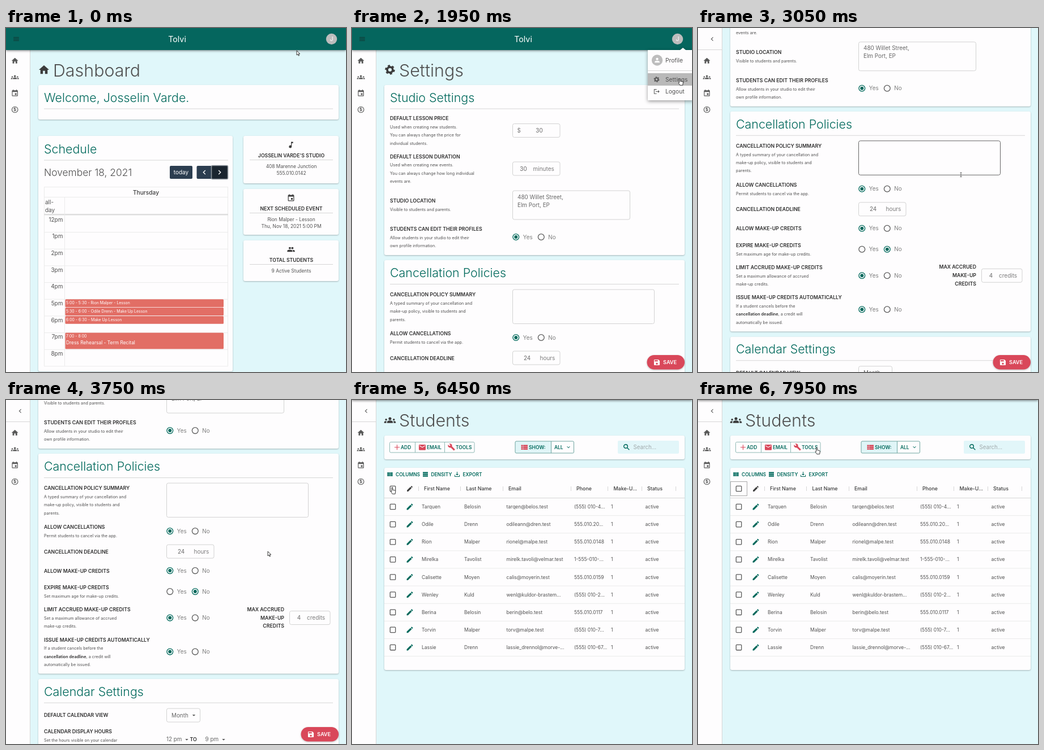
Animation, 600 px wide and 609 px high, one loop 8000 ms. Source, as an HTML page:

```html
<!DOCTYPE html>
<html lang="en">
<head>
<meta charset="utf-8">
<title>Studio manager tour</title>
<style>
  html, body { margin: 0; width: 100%; height: 100%; overflow: hidden; background: #e0f7fa; }
  svg { display: block; width: 600px; height: 609px; font-family: Inter, "Open Sans", sans-serif; }
  text { fill: #505050; white-space: pre; }
  .bold { font-weight: 600; fill: #2e2e2e; }
  .medium { font-weight: 500; fill: #3a3a3a; }
  .large { font-weight: 350; }
  .teal { fill: #00695c; }
  .white { fill: #fff; }
  .grey { fill: #7c7c7c; }
  .value { fill: #666; }
  .pale { fill: #a0a8aa; }
  .mid { text-anchor: middle; }
  .end { text-anchor: end; }
  .card { fill: #fefdfe; filter: drop-shadow(0 1px 1px #0004); }
  .field { fill: none; stroke: #d2d2d2; }
  .field.hover { stroke: #666; }
  .line { stroke: #d6d6d6; }
  .faint { stroke: #ebebeb; }
</style>
</head>
<body>
<svg id="stage" viewBox="0 0 600 609"></svg>
<script>
const TEAL = '#00695c', RED = '#d9485a', DARK = '#3c3c3c', GREY = '#5a5a5a', NAVY = '#2c3e50';

const ICONS = {
  home: '<path d="M10 20v-6h4v6h5v-8h3L12 3 2 12h3v8z"/>',
  menu: '<path d="M3 18h18v-2H3zM3 13h18v-2H3zM3 6v2h18V6z"/>',
  groups: `<circle cx="12" cy="9" r="3"/><circle cx="4" cy="11" r="2"/><circle cx="20" cy="11" r="2"/>
    <path d="M6 18v-1.6q0-3.6 6-3.6t6 3.6V18zM0 18v-1.6Q0 14 4 14l1.1.1q-.6 1-.6 2.3V18zM24 18v-1.6Q24 14 20 14l-1.1.1q.6 1 .6 2.3V18z"/>`,
  people: `<circle cx="8.5" cy="8" r="3.2"/><circle cx="16" cy="8" r="3.2"/>
    <path d="M1 19v-2.3Q1 13 8.5 13t7.5 3.7V19zM17.5 19v-2.5q0-2-1.6-3.4 7.1.2 7.1 3.6V19z"/>`,
  event: '<path d="M17 12h-5v5h5zM16 1v2H8V1H6v2H5q-2 0-2 2v14q0 2 2 2h14q2 0 2-2V5q0-2-2-2h-1V1zM19 19H5V8h14z"/>',
  dollar: `<circle cx="12" cy="12" r="9" fill="none" stroke="currentColor" stroke-width="2"/>
    <text x="12" y="17" font-size="14" class="mid medium">$</text>`,
  gear: `<g fill="none" stroke="currentColor"><circle cx="12" cy="12" r="5.6" stroke-width="4.2"/>
    <circle cx="12" cy="12" r="8.4" stroke-width="3.2" pathLength="12" stroke-dasharray="1 1"/></g>`,
  edit: '<path d="M3 17.25V21h3.75L17.8 9.94l-3.75-3.75zM20.7 7q.6-.7 0-1.4l-2.3-2.3q-.7-.6-1.4 0l-1.9 1.8 3.75 3.75z"/>',
  note: '<path d="M12 3v10.55A4 4 0 1 0 14 17V7h4V3z"/>',
  save: '<path d="M17 3H5q-2 0-2 2v14q0 2 2 2h14q2 0 2-2V7zM12 19a3 3 0 1 1 0-6 3 3 0 0 1 0 6zM15 9H5V5h10z"/>',
  email: '<path d="M20 4H4q-2 0-2 2v12q0 2 2 2h16q2 0 2-2V6q0-2-2-2zM20 8l-8 5-8-5V6l8 5 8-5z"/>',
  wrench: '<path d="M22.7 19l-9.1-9.1c.9-2.3.4-5-1.5-6.9-2-2-5-2.4-7.4-1.3L9 6 6 9 1.6 4.7C.4 7.1.9 10.1 2.9 12.1c1.9 1.9 4.6 2.4 6.9 1.5l9.1 9.1q.7.6 1.4 0l2.3-2.3q.7-.8.1-1.4z"/>',
  search: '<g fill="none" stroke="currentColor" stroke-width="2.4"><circle cx="9.5" cy="9.5" r="5.5"/><path d="M14 14l6 6"/></g>',
  list: '<path d="M3 5h5v4H3zM3 10h5v4H3zM3 15h5v4H3zM9 5h13v4H9zM9 10h13v4H9zM9 15h13v4H9z"/>',
  plus: '<path d="M11 4h2v7h7v2h-7v7h-2v-7H4v-2h7z"/>',
  columns: '<path d="M3 5h5v14H3zM9.5 5h5v14h-5zM16 5h5v14h-5z"/>',
  density: '<path d="M3 4h18v4.5H3zM3 10h18v4.5H3zM3 16h18v4.5H3z"/>',
  download: '<path d="M11 3h2v8h4l-5 5-5-5h4zM3 14h2v5h14v-5h2v7H3z"/>',
  logout: '<path d="M3 4h9v2H5v12h7v2H3zM9 11h8V7l5 5-5 5v-4H9z"/>',
  left: '<path d="M15.4 7.4L14 6l-6 6 6 6 1.4-1.4-4.6-4.6z"/>',
  right: '<path d="M8.6 7.4L10 6l6 6-6 6-1.4-1.4 4.6-4.6z"/>',
  down: '<path d="M7.4 8.6L6 10l6 6 6-6-1.4-1.4-4.6 4.6z"/>',
  caret: '<path d="M7 10l5 5 5-5z"/>',
  person: '<circle cx="12" cy="8" r="4"/><path d="M4 20v-2q0-4 8-4t8 4v2z"/>',
};

// y is the vertical middle of the capitals
const text = (x, y, size, str, cls = '') =>
  `<text x="${x}" y="${y + size * .36}" font-size="${size}" class="${cls}">${str}</text>`;
const icon = (name, x, y, size, color = GREY) =>
  `<g transform="translate(${x - size / 2} ${y - size / 2}) scale(${size / 24})" style="color:${color}" fill="currentColor" fill-rule="evenodd">${ICONS[name]}</g>`;
const rect = (x, y, w, h, attrs = '') => `<rect x="${x}" y="${y}" width="${w}" height="${h}" ${attrs}/>`;
const line = (x1, y1, x2, y2, cls = 'line') => `<path class="${cls}" d="M${x1} ${y1}L${x2} ${y2}"/>`;
const card = (x, y, right, bottom) => rect(x, y, right - x, bottom - y, 'rx="3" class="card"');
const field = (x, y, right, bottom) => rect(x, y, right - x, bottom - y, 'rx="3" class="field"');
const range = (n, fn) => Array.from({ length: n }, (_, i) => fn(i)).join('');
const title = (name, size, y, str) => icon(name, 67, y - 1, size, DARK) + text(83, y, 30.4, str, 'large');
const section = (y, str, right = 577) => text(67, y, 21.4, str, 'teal large') + line(67, y + 20, right, y + 20);

function infoCard(top, bottom, name, label, ...lines) {
  return card(419, top, 587, bottom) + icon(name, 503, top + 16, 14.5, DARK) +
    text(503.5, top + 35, 8.7, label, 'bold mid') + line(430, top + 42.5, 577, top + 42.5) +
    lines.map((s, i) => text(503.5, top + 54 + 12 * i, 8.4, s, 'mid')).join('');
}

function dashboard() {
  const hour = 29.65, grid = 332;
  const event = (start, length, ...lines) => {
    const y = grid + start * hour;
    return rect(104.5, y, 279.5, length * hour - .9, 'rx="1.5" fill="#e26e65"') +
      lines.map((s, i) => text(106, y + 6.3 + i * 11.5, i ? 8.4 : 6.9, s, 'white')).join('');
  };
  return title('home', 21.6, 75, 'Dashboard') +
    card(57, 101, 587, 162) + section(123, 'Welcome, Josselin Varde.') +
    card(57, 191, 400, 608) + section(214, 'Schedule', 392) +
    text(67, 255.5, 17.4, 'November 18, 2021', 'large') +
    rect(289, 244, 40, 23, `rx="2" fill="${NAVY}"`) + text(309, 255, 10, 'today', 'white mid') +
    rect(336.5, 244, 55, 23, `rx="2" fill="${NAVY}"`) +
    rect(362.5, 243.5, 29, 24, 'rx="2" fill="#1a252f" stroke="#8d959c" stroke-width="1.6"') +
    icon('left', 350, 255.5, 16, '#fff') + icon('right', 377, 255.5, 16, '#fff') +
    line(67, 281.5, 392, 281.5, 'faint') + line(67, 299.5, 392, 299.5, 'faint') +
    line(67.5, 281, 67.5, 598, 'faint') + line(391.5, 281, 391.5, 598, 'faint') +
    text(247, 291, 10.2, 'Thursday', 'medium mid') +
    text(69, 308, 10, 'all-') + text(69, 322, 10, 'day') +
    rect(67, 329, 325, 2.5, 'fill="#dedede"') + line(103.5, 300, 103.5, 598, 'faint') +
    range(9, i => text(100.5, grid + 7 + i * hour, 10, (i || 12) + 'pm', 'end') +
      line(67, grid + (i + 1) * hour, 392, grid + (i + 1) * hour, 'faint')) +
    event(5, .5, '5:00 - 5:30 - Rion Malper - Lesson') +
    event(5.5, .5, '5:30 - 6:00 - Odile Drenn - Make Up Lesson') +
    event(6, .5, '6:00 - 6:30 - Make Up Lesson') +
    event(7, 1, '7:00 - 8:00', 'Dress Rehearsal - Term Recital') +
    infoCard(191, 275, 'note', "JOSSELIN VARDE'S STUDIO", '408 Marenne Junction', '555.010.0142') +
    infoCard(285, 366, 'event', 'NEXT SCHEDULED EVENT', 'Rion Malper - Lesson', 'Thu, Nov 18, 2021 5:00 PM') +
    infoCard(376, 448, 'people', 'TOTAL STUDENTS', '9 Active Students');
}

function settings() {
  const option = (y, label, ...notes) => text(67, y, 8.75, label, 'bold') +
    notes.map((s, i) => text(67, y + 15.2 + 14.4 * i, 7.25, s)).join('');
  const radio = (x, y, label, on) =>
    `<circle cx="${x}" cy="${y}" r="5.4" fill="none" stroke="${on ? TEAL : GREY}" stroke-width="1.3"/>` +
    (on ? `<circle cx="${x}" cy="${y}" r="3" fill="${TEAL}"/>` : '') + text(x + 12.5, y, 9.8, label, 'grey');
  const yesNo = (y, yes = true) => radio(289.3, y, 'Yes', yes) + radio(333.8, y, 'No', !yes);
  const amount = (y, x, value, unit, unitX) => field(283.5, y - 12, 367, y + 12) +
    text(x, y, 9.9, value, 'value mid') + text(unitX, y, 10, unit, 'grey');
  return title('gear', 21, 75, 'Settings') +
    card(57, 101, 587, 402) + section(123, 'Studio Settings') +
    option(160, 'DEFAULT LESSON PRICE', 'Used when creating new students.', 'You can always change the price for', 'individual students.') +
    amount(181.5, 330.5, '30', '$', 291.5) +
    option(227.5, 'DEFAULT LESSON DURATION', 'Used when creating new events.', 'You can always change how long individual', 'events are.') +
    amount(249, 302.5, '30', 'minutes', 319.5) +
    option(306, 'STUDIO LOCATION', 'Visible to students and parents.') +
    field(283.5, 288, 490.5, 339) +
    text(292, 299, 9.9, '480 Willet Street,', 'value') + text(292, 313, 9.9, 'Elm Port, EP', 'value') +
    option(356, 'STUDENTS CAN EDIT THEIR PROFILES', 'Allow students in your studio to edit their', 'own profile information.') +
    yesNo(370) +
    card(57, 411, 587, 800.5) + section(433.5, 'Cancellation Policies') +
    option(472, 'CANCELLATION POLICY SUMMARY', 'A typed summary of your cancellation and', 'make-up policy, visible to students and', 'parents.') +
    field(283.5, 463, 533.5, 523.5) +
    option(541, 'ALLOW CANCELLATIONS', 'Permit students to cancel via the app.') + yesNo(548) +
    option(584.5, 'CANCELLATION DEADLINE') + amount(584, 309, '24', 'hours', 331.5) +
    option(618.5, 'ALLOW MAKE-UP CREDITS') + yesNo(618) +
    option(648, 'EXPIRE MAKE-UP CREDITS', 'Set maximum age for make-up credits.') + yesNo(655, false) +
    option(687, 'LIMIT ACCRUED MAKE-UP CREDITS', 'Set a maximum allowance of accrued', 'make-up credits.') + yesNo(701.5) +
    ['MAX ACCRUED', 'MAKE-UP', 'CREDITS'].map((s, i) => text(491, 686.5 + 14.8 * i, 8.75, s, 'bold end')).join('') +
    field(500.5, 689.5, 572, 713.5) + text(517, 701.5, 9.9, '4', 'value mid') + text(531, 701.5, 10, 'credits', 'grey') +
    option(740.5, 'ISSUE MAKE-UP CREDITS AUTOMATICALLY', 'If a student cancels before the',
      '<tspan class="bold">cancellation deadline</tspan>, a credit will', 'automatically be issued.') + yesNo(761.5) +
    card(57, 810, 587, 1100) + section(832, 'Calendar Settings') +
    option(874, 'DEFAULT CALENDAR VIEW') + field(283.5, 862, 342.5, 886) +
    text(292, 874, 9.9, 'Month', 'value') + icon('caret', 331.5, 874, 13) +
    option(903, 'CALENDAR DISPLAY HOURS', 'Set the hours visible on your calendar') +
    text(283, 916, 9.9, '12 pm', 'value') + icon('caret', 319, 917, 13) + text(324.5, 917, 8.75, 'TO', 'bold') +
    text(351.5, 916, 9.9, '9 pm', 'value') + icon('caret', 384, 917, 13);
}

const STUDENTS = [
  ['Tarquen', 'Belosin', 'tarqen@belos.test', '(555) 010-4...'],
  ['Odile', 'Drenn', 'odileann@dren.test', '555.010.20...'],
  ['Rion', 'Malper', 'rionel@malpe.test', '555.010.0148'],
  ['Mirelka', 'Tavolist', 'mirelk.tavoli@velmar.test', '1-555-010-...'],
  ['Calisette', 'Moyen', 'calis@moyerin.test', '555.010.0159'],
  ['Wenley', 'Kuld', 'wenl@kuldor-brastem...', '(555) 010-2...'],
  ['Berina', 'Belosin', 'berin@belo.test', '555.010.0117'],
  ['Torvin', 'Malper', 'torv@malpe.test', '(555) 010-7...'],
  ['Lassie', 'Drenn', 'lassie_drennol@morve-...', '(555) 010-67...'],
];

function students() {
  const box = y => rect(67.3, y - 4.7, 9.4, 9.4, `rx="1" class="off" fill="none" stroke="${GREY}" stroke-width="1.3"`) +
    `<g class="on">${rect(66.7, y - 5.3, 10.6, 10.6, `rx="1.4" fill="${TEAL}"`)}
     <path d="M69 ${y}l2.2 2.3 4-4.4" fill="none" stroke="#fff" stroke-width="1.3"/></g>`;
  const row = (cells, i) => {
    const y = 189 + 31.13 * i;
    return rect(57, y - 15.5, 530, 31.13, 'class="on" fill="#ebf0f0"') + box(y) + icon('edit', 102, y, 14.5, TEAL) +
      [...cells, '1', 'active'].map((s, c) => text([123, 198, 272.5, 392, 457, 517.5][c], y, 8.5, s)).join('') +
      line(57, y + 15.6, 587, y + 15.6, 'faint');
  };
  const heads = ['First Name', 'Last Name', 'Email', 'Phone', 'Make-U...', 'Status'];
  const tool = (x, name, label) => icon(name, x, 131.5, 12, TEAL) + text(x + 10, 131.5, 8.4, label, 'bold teal');
  const outline = 'fill="none" stroke="#8fb9b5"';
  return `<g transform="translate(0 39)">` + title('groups', 20.5, 36.5, 'Students') +
    card(57, 63, 587, 105) + rect(66.5, 74.5, 149.5, 18.5, 'rx="2" ' + outline) +
    `<path d="M111.5 75v18M163.5 75v18" ${outline}/>` +
    icon('plus', 79.5, 83.8, 13.5, RED) + text(86, 83.8, 8.4, 'ADD', 'bold teal') +
    icon('email', 124, 83.8, 14.5, RED) + text(132, 83.8, 8.4, 'EMAIL', 'bold teal') +
    icon('wrench', 175.5, 83.3, 13.5, RED) + text(183, 83.8, 8.4, 'TOOLS', 'bold teal') +
    rect(288, 73, 63.5, 21, 'rx="2" fill="#e0f5f7"') + rect(288, 73, 103.5, 21, 'rx="2" fill="none" stroke="#6fa5a0"') +
    `<path d="M351.5 73v21" stroke="#6fa5a0"/>` +
    icon('list', 304, 83.8, 14.5, RED) + text(312, 83.8, 8.6, 'SHOW:', 'bold teal') +
    text(357, 83.8, 8.4, 'ALL', 'bold teal') + icon('down', 382, 83.5, 11, TEAL) +
    rect(469, 72, 108, 23, 'rx="2" fill="#e2f6f9"') + icon('search', 484.5, 83.5, 14.5, TEAL) +
    text(496.5, 83.5, 9.7, 'Search...', 'pale') +
    card(57, 120, 587, 478) +
    tool(67, 'columns', 'COLUMNS') + tool(129.5, 'density', 'DENSITY') + tool(185.5, 'download', 'EXPORT') +
    `<g id="focus">${rect(57.5, 144.5, 29, 25, 'fill="none" stroke="#a9a9a9"')}</g>` +
    `<circle class="on" cx="72" cy="157" r="8.5" fill="${TEAL}" opacity=".22"/>` +
    box(157) + icon('edit', 102, 157, 13, DARK) +
    heads.map((s, i) => text([127, 201.5, 276, 396, 461.5, 521][i], 157, 8.9, s, 'medium')).join('') +
    [117.5, 191.5, 266.5, 386.5, 451.5, 511.5, 571.5].map(x => line(x, 153, x, 161)).join('') +
    line(57, 173.5, 587, 173.5) + STUDENTS.map(row).join('') + '</g>';
}

const SIDE_ITEMS = [['home', 58], ['groups', 87], ['event', 115.5], ['dollar', 144.5]];
const sidebar = rect(0, 0, 42, 609, 'fill="#fefdfe"') +
  rect(0, 0, 42, 28.5, 'id="sideHover" fill="#eee"') + line(42.5, 0, 42.5, 609) + line(0, 38.5, 42, 38.5) +
  icon('left', 25, 19.5, 14) + SIDE_ITEMS.map(([name, y]) => icon(name, 15.7, y, 14)).join('');
const appBar = rect(0, 0, 600, 39, 'fill="#05665e" style="filter:drop-shadow(0 1px 2px #0008)"') +
  icon('menu', 18, 19.5, 13, '#16302d') + text(302, 19.5, 14.3, 'Tolvi', 'white mid') +
  '<circle cx="574.5" cy="19.5" r="9.7" fill="#bdbdbd"/>' + text(574.5, 19.5, 10.5, 'J', 'white mid');
const menu = `<path d="M522 39h57l5-4 5 4h13v89h-80z" fill="#fefdfe" style="filter:drop-shadow(0 2px 3px #0006)"/>` +
  rect(522, 80, 78, 22, 'id="menuHover" fill="#b9b9b9"') + line(522, 75.5, 600, 75.5) +
  '<circle cx="538.5" cy="57" r="9.7" fill="#bdbdbd"/>' + icon('person', 538.5, 57, 13, '#fff') +
  text(553, 57, 10.2, 'Profile') + icon('gear', 537.5, 91, 12) + text(553, 91, 10.2, 'Settings') +
  icon('logout', 537.5, 112.5, 12.5) + text(553, 112.5, 10.2, 'Logout');
const saveButton = rect(520.5, 579, 66.5, 25.5, `rx="12.75" fill="${RED}" style="filter:drop-shadow(0 1px 1.5px #0004)"`) +
  icon('save', 538, 592, 13.5, '#fff') + text(549, 592, 9.2, 'SAVE', 'bold white');
const cursors = `<g fill="#fff" stroke="#222" stroke-width=".9" stroke-linejoin="round">
  <path id="arrow" d="M0 0v8l1.9-1.7 1.3 2.9 1.3-.6-1.3-2.8h2.5z"/>
  <path id="hand" d="M-.9 0q.9-1 1.8 0v4.2l4 .8q1 .3.9 1.4l-.6 4.9H.3L-2.4 7.2q0-1.2 1.5-.6z"/>
  <path id="beam" fill="none" stroke="#555" d="M-1.5-3.5h3M0-3.5v7.5M-1.5 4h3"/></g>`;

const stage = document.getElementById('stage');
stage.innerHTML = `<g id="pages"><g id="dashboard">${dashboard()}</g><g id="settings">${settings()}</g><g id="students">${students()}</g></g>
  <g>${sidebar}</g><g id="bar">${appBar}</g><g id="save">${saveButton}</g><g id="menu">${menu}</g><g id="cursor">${cursors}</g>`;

const el = id => document.getElementById(id);
const show = (node, on) => { node.style.display = on ? '' : 'none'; };
const all = selector => [...stage.querySelectorAll(selector)];
const fields = all('.field'), onParts = all('.on'), offParts = all('.off');
const clamp = v => Math.min(1, Math.max(0, v));
const ease = v => (v = clamp(v), v * v * (3 - 2 * v));

const LOOP = 8000, NOTCH = 52.65;
const WHEEL = [2650, 2730, 2810, 2880, 2940, 3560];
const POINTER = [
  [0, 513, 40], [150, 513, 40], [550, 574, 18], [900, 574, 18], [1400, 578.5, 90], [2050, 578.5, 90],
  [2500, 464, 259.5], [3400, 464, 259.5], [3600, 462, 268], [4000, 462, 268], [4600, 13, 84], [5450, 13, 84],
  [5850, 160, 270], [6350, 71, 155], [6800, 71, 155], [7100, 81, 133], [7200, 81, 133],
  [7400, 71, 155], [7550, 71, 155], [7900, 209.5, 84.5], [LOOP, 209.5, 84.5],
];

function pointerAt(t) {
  const i = POINTER.findIndex(p => p[0] > t), [t0, x0, y0] = POINTER[i - 1], [t1, x1, y1] = POINTER[i];
  const k = ease((t - t0) / (t1 - t0));
  return [x0 + (x1 - x0) * k, y0 + (y1 - y0) * k];
}

function draw(t) {
  const page = t < 1750 ? 'dashboard' : t < 4800 ? 'settings' : 'students';
  const scroll = page === 'students' ? 39 : WHEEL.reduce((sum, at) => sum + NOTCH * ease((t - at) / 100), 0);
  const [x, y] = pointerAt(t);
  const over = (left, top, right, bottom) => x >= left && x <= right && y >= top && y <= bottom;

  for (const id of ['dashboard', 'settings', 'students']) show(el(id), id === page);
  show(el('save'), page === 'settings');
  el('pages').setAttribute('transform', `translate(0 ${-scroll})`);
  el('bar').setAttribute('transform', `translate(0 ${-scroll})`);

  const menuShade = clamp((t - 700) / 150) * clamp((2250 - t) / 150);
  const onSettings = menuShade > 0 && over(522, 80, 600, 102);
  el('menu').style.opacity = menuShade;
  show(el('menuHover'), onSettings);

  const side = SIDE_ITEMS.find(([, iy]) => over(0, iy - 14, 42, iy + 14));
  show(el('sideHover'), side);
  if (side) el('sideHover').setAttribute('y', side[1] - 14);

  const selected = t >= 6500 && t < 7450;
  onParts.forEach(node => show(node, selected));
  offParts.forEach(node => show(node, !selected));
  show(el('focus'), t >= 6500);

  let typing = false;
  for (const f of fields) {
    const left = f.x.baseVal.value, top = f.y.baseVal.value - scroll;
    const hit = page === 'settings' && over(left, top, left + f.width.baseVal.value, top + f.height.baseVal.value);
    f.classList.toggle('hover', hit);
    typing ||= hit;
  }
  const pointing = side || onSettings || (scroll === 0 && over(565, 10, 584, 29)) ||
    (page === 'students' && (over(64, 149, 80, 165) || over(58, 125, 230, 138) || over(67, 75, 216, 93)));
  show(el('beam'), typing);
  show(el('hand'), pointing && !typing);
  show(el('arrow'), !pointing && !typing);
  el('cursor').setAttribute('transform', `translate(${x} ${y})`);
}

function tick() {
  draw(performance.now() % LOOP);
  requestAnimationFrame(tick);
}
tick();
</script>
</body>
</html>
```
